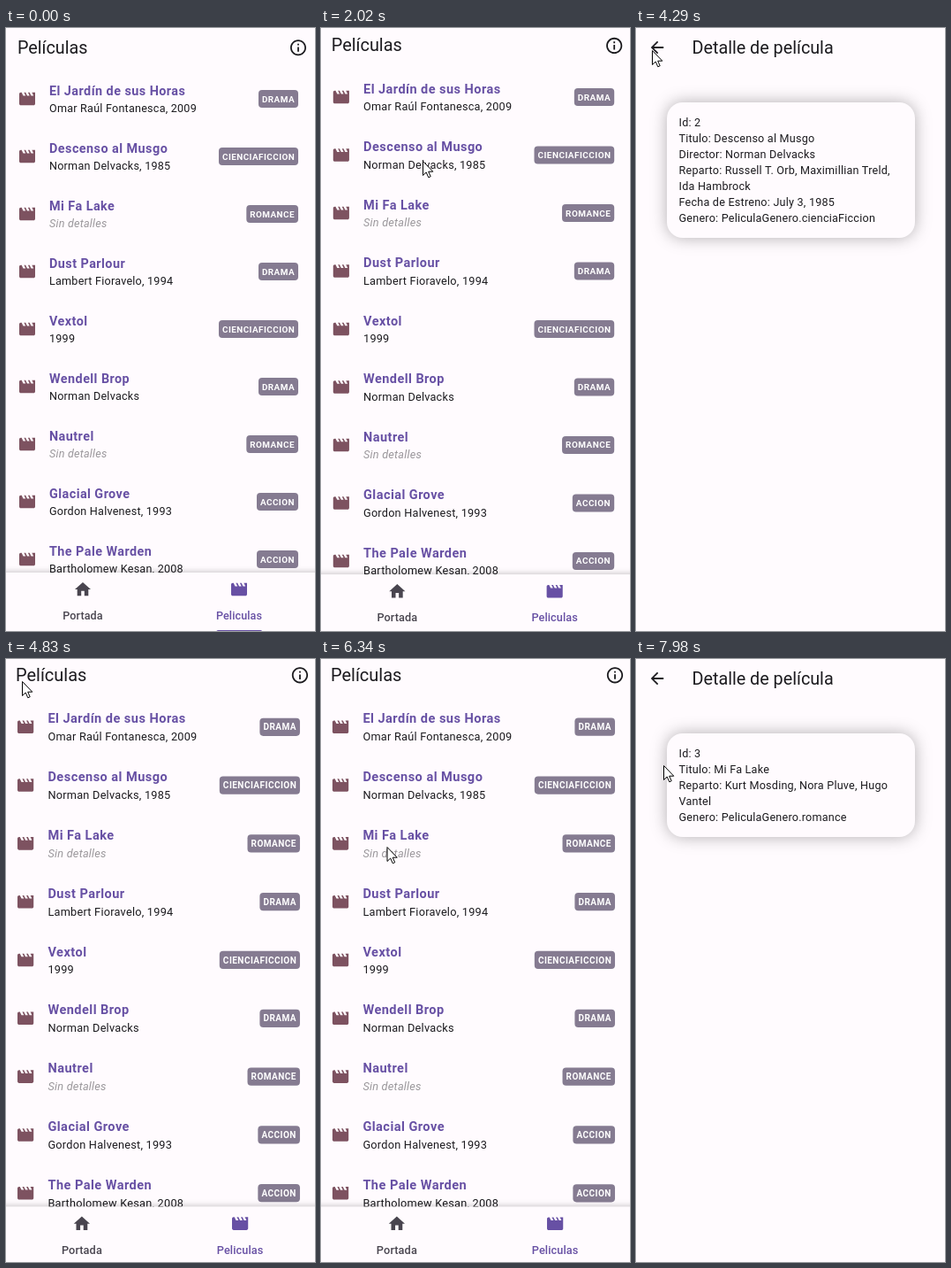
Recreate the animation shown at these times as an HTML page. Size 350 by 681 pixels, loop 8000 ms.

```html
<!DOCTYPE html>
<html lang="es">
<head>
<meta charset="utf-8">
<title>Películas</title>
<style>
  html, body { margin: 0; width: 100%; height: 100%; overflow: hidden; background: #fffbfe; }
  svg { display: block; width: 100%; height: 100%; overflow: hidden; }
  text { font-family: Roboto, sans-serif; fill: #1c1b1f; white-space: pre; }
  .heading { font-size: 19.75px; }
  .title { font-size: 14.4px; font-weight: 700; letter-spacing: .45px; fill: #6750a4; }
  .body { font-size: 12.6px; letter-spacing: .225px; }
  .empty { font-style: italic; fill: #9a979b; }
  .tag { font-size: 9.9px; font-weight: 700; letter-spacing: .45px; fill: #fff; }
  .tab { font-size: 12.6px; font-weight: 500; letter-spacing: .09px; text-anchor: middle; fill: #49454f; }
  .active { fill: #6750a4; }
  .bar { filter: drop-shadow(0 -1px 3px rgba(0, 0, 0, .22)); }
  .card { filter: drop-shadow(0 0 9px rgba(0, 0, 0, .3)); }
</style>
</head>
<body>
<svg id="stage" viewBox="0 0 350 681" preserveAspectRatio="none"></svg>
<script>
const LOOP = 8000;
const SURFACE = '#fffbfe', PURPLE = '#6750a4', GREY = '#49454f', INK = '#1c1b1f';
const stage = document.getElementById('stage');

const ICONS = {
  movie: 'M18 4l2 4h-3l-2-4h-2l2 4h-3l-2-4H8l2 4H7L5 4H4c-1.1 0-1.99.9-1.99 2L2 18c0 1.1.9 2 2 2h16c1.1 0 2-.9 2-2V4h-4z',
  info: 'M11 7h2v2h-2zm0 4h2v6h-2zm1-9C6.48 2 2 6.48 2 12s4.48 10 10 10 10-4.48 10-10S17.52 2 12 2zm0 18c-4.41 0-8-3.59-8-8s3.59-8 8-8 8 3.59 8 8-3.59 8-8 8z',
  back: 'M20 11H7.83l5.59-5.59L12 4l-8 8 8 8 1.41-1.41L7.83 13H20v-2z',
  home: 'M10 20v-6h4v6h5v-8h3L12 3 2 12h3v8z'
};

const TAG_WIDTH = { DRAMA: 45, CIENCIAFICCION: 90, ROMANCE: 58.7, ACCION: 47 };

const MOVIES = [
  ['El Jardín de sus Horas', 'Omar Raúl Fontanesca, 2009', 'DRAMA'],
  ['Descenso al Musgo', 'Norman Delvacks, 1985', 'CIENCIAFICCION'],
  ['Mi Fa Lake', '', 'ROMANCE'],
  ['Dust Parlour', 'Lambert Fioravelo, 1994', 'DRAMA'],
  ['Vextol', '1999', 'CIENCIAFICCION'],
  ['Wendell Brop', 'Norman Delvacks', 'DRAMA'],
  ['Nautrel', '', 'ROMANCE'],
  ['Glacial Grove', 'Gordon Halvenest, 1993', 'ACCION'],
  ['The Pale Warden', 'Bartholomew Kesan, 2008', 'ACCION']
];

const DETAILS = [
  ['Id: 2', 'Titulo: Descenso al Musgo', 'Director: Norman Delvacks',
   'Reparto: Russell T. Orb, Maximillian Treld,', 'Ida Hambrock',
   'Fecha de Estreno: July 3, 1985', 'Genero: PeliculaGenero.cienciaFiccion'],
  ['Id: 3', 'Titulo: Mi Fa Lake', 'Reparto: Kurt Mosding, Nora Pluve, Hugo',
   'Vantel', 'Genero: PeliculaGenero.romance']
];

const text = (cls, x, y, s) => `<text class="${cls}" x="${x}" y="${y}">${s}</text>`;
const icon = (name, cx, cy, color) =>
  `<path d="${ICONS[name]}" fill="${color}" transform="translate(${cx - 10.8} ${cy - 10.8}) scale(.9)"/>`;
const rect = (x, y, w, h, fill, extra = '') =>
  `<rect x="${x}" y="${y}" width="${w}" height="${h}" fill="${fill}" ${extra}/>`;
const page = (id, content) => `<g id="${id}">${rect(0, 0, 350, 681, SURFACE)}${content}</g>`;

function movieRow([title, info, tag], i) {
  const y = 80 + 65 * i, left = 331 - TAG_WIDTH[tag];
  return icon('movie', 24, y, '#7d5260')
    + text('title', 49, y - 4.3, title)
    + text(info ? 'body' : 'body empty', 49, y + 15.3, info || 'Sin detalles')
    + rect(left, y - 10, TAG_WIDTH[tag], 20, '#857b91', 'rx="4"')
    + text('tag', left + 4, y + 3.5, tag);
}

const tabBar = rect(-10, 615, 370, 80, SURFACE, 'class="bar"')
  + icon('home', 87, 634, GREY) + text('tab', 87, 667.5, 'Portada')
  + icon('movie', 264, 634, PURPLE) + text('tab active', 264, 667.5, 'Peliculas')
  + rect(238, 680, 52.5, 6, PURPLE, 'rx="2.7"');

const detailPage = (lines, i) => page('detail' + i,
  icon('back', 24, 22, INK)
  + text('heading', 63.5, 28.7, 'Detalle de película')
  + rect(35, 84, 281, 27 + 18 * lines.length, SURFACE, 'rx="18" class="card"')
  + lines.map((line, n) => text('body', 48.5, 111 + 18 * n, line)).join(''));

stage.innerHTML = page('list',
    text('heading', 13, 28.7, 'Películas') + icon('info', 331, 22.3, INK)
    + MOVIES.map(movieRow).join('') + tabBar)
  + rect(0, 0, 350, 681, '#000', 'id="scrim"')
  + DETAILS.map(detailPage).join('')
  + '<path id="cursor" d="M.5.5V16.5L4.2 13L6.8 18.8L9.2 17.7L6.7 12.2H11.8Z" fill="#fff" stroke="#000" stroke-linejoin="round"/>';

const [list, scrim, cursor] = ['list', 'scrim', 'cursor'].map(id => document.getElementById(id));
const details = DETAILS.map((_, i) => document.getElementById('detail' + i));

const clamp = v => Math.min(1, Math.max(0, v));
const interval = (p, a, b) => clamp((p - a) / (b - a));

function cubic(x, x1, y1, x2, y2) {
  const at = (s, a, b) => 3 * s * (1 - s) * ((1 - s) * a + s * b) + s ** 3;
  let lo = 0, hi = 1;
  for (let i = 0; i < 24; i++) {
    const mid = (lo + hi) / 2;
    if (at(mid, x1, x2) < x) lo = mid; else hi = mid;
  }
  return at(lo, y1, y2);
}

// Two-part emphasized curve of the zoom page transition
const zoomCurve = p => p >= 1 ? 1 : p < 1 / 6
  ? .4 * cubic(p * 6, .05, 0, .133333, .06)
  : .4 + .6 * cubic((p - 1 / 6) * 1.2, .208333, .82, .25, 1);

const TRANSITION = 300;
const ROUTES = [
  { start: 2000, detail: 0, push: true },
  { start: 4710, detail: 0, push: false },
  { start: 6308, detail: 1, push: true }
];

// Each move: start, end, from x, y, to x, y
const MOVES = [
  [640, 1490, 346, 378, 115, 150],
  [3180, 4010, 115, 150, 18, 29],
  [4010, 4290, 18, 29, 18, 25],
  [5300, 5920, 18, 25, 74.5, 212],
  [6750, 7030, 74.5, 212, 84.5, 249],
  [7560, 7980, 84.5, 249, 31, 120]
];

function setScale(el, s) {
  el.setAttribute('transform', `translate(175 340.5) scale(${s}) translate(-175 -340.5)`);
}

function drawPages(t) {
  const route = ROUTES.filter(r => t >= r.start).pop();
  let listScale = 1, detailScale = 1, opacity = 0, dim = 0;
  if (route) {
    const p = clamp((t - route.start) / TRANSITION), c = zoomCurve(p);
    if (route.push) {
      listScale = 1 + .05 * c;
      detailScale = .85 + .15 * c;
      opacity = interval(p, .125, .25);
      dim = p < 1 ? .6 * interval(p, .2075, .4175) : 0;
    } else {
      listScale = 1.1 - .1 * c;
      detailScale = 1 - .1 * c;
      opacity = 1 - interval(p, .0825, .2075);
    }
  }
  setScale(list, listScale);
  scrim.setAttribute('opacity', dim);
  details.forEach((el, i) => {
    const shown = route && route.detail === i && opacity > 0;
    el.setAttribute('display', shown ? 'inline' : 'none');
    el.setAttribute('opacity', opacity);
    setScale(el, detailScale);
  });
}

function drawCursor(t) {
  const move = MOVES.filter(m => t >= m[0]).pop();
  cursor.setAttribute('display', move ? 'inline' : 'none');
  if (!move) return;
  const [start, end, x0, y0, x1, y1] = move;
  const p = interval(t, start, end);
  const e = move === MOVES[0] ? 1 - (1 - p) ** 2 : p * p * (3 - 2 * p);
  cursor.setAttribute('transform', `translate(${x0 + (x1 - x0) * e} ${y0 + (y1 - y0) * e})`);
}

function render(t) {
  drawPages(t);
  drawCursor(t);
}

const origin = performance.now();
function tick() {
  render((performance.now() - origin) % LOOP);
  requestAnimationFrame(tick);
}
tick();
</script>
</body>
</html>
```
